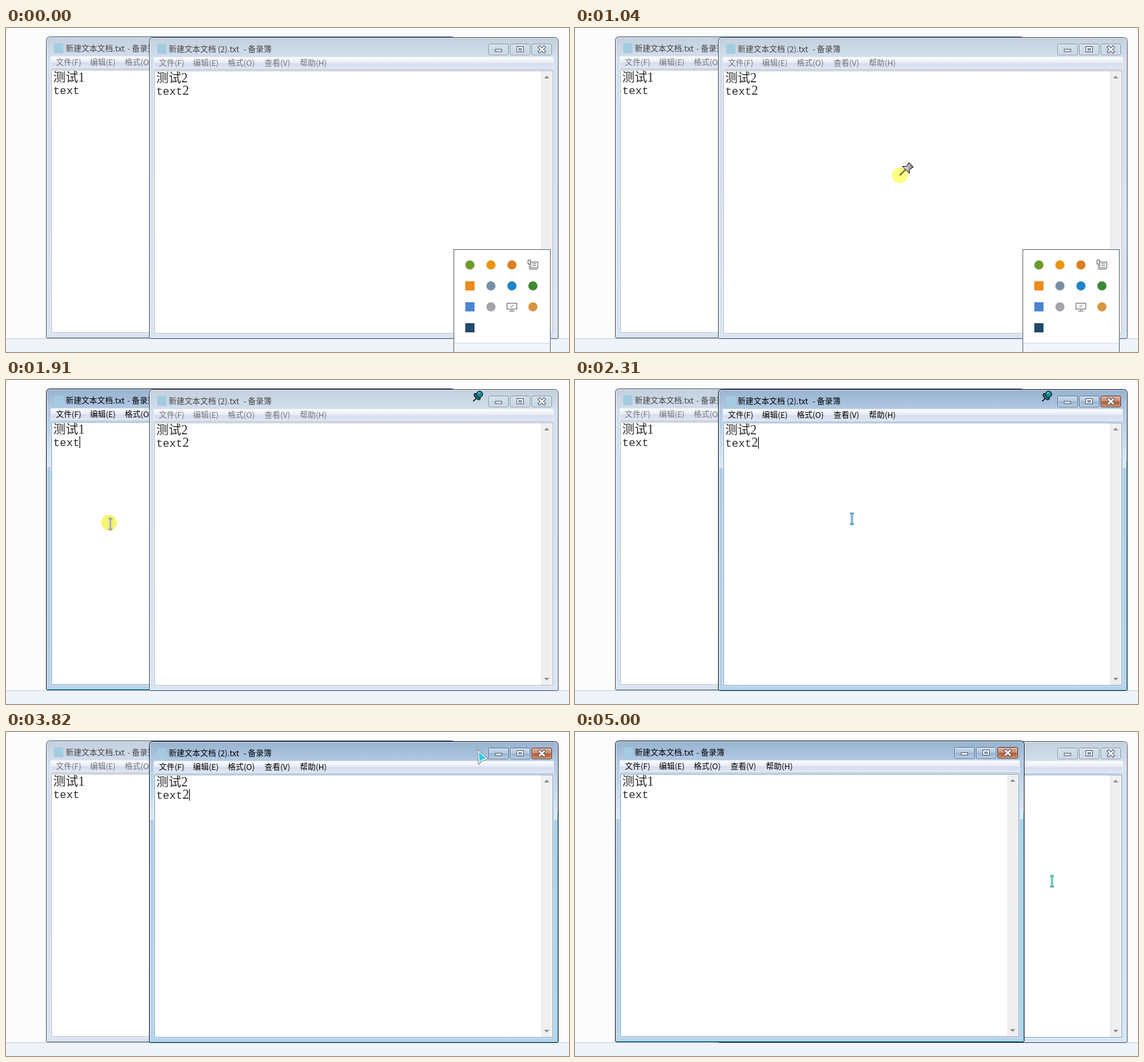
An HTML page for the animation above (5160 ms loop, 858 px wide and 495 px high).

```html
<!DOCTYPE html>
<html lang="zh">
<head>
<meta charset="utf-8">
<style>
html, body { margin: 0; width: 100%; height: 100%; overflow: hidden; background: #fcfcfc; }
svg { display: block; width: 858px; height: 495px; }
text { white-space: pre; font-family: "Noto Sans CJK SC", "Noto Sans CJK", sans-serif; font-size: 12px; }
.cjk { font-size: 19px; font-weight: 300; fill: #2c2c2c; }
.mono { font-family: "Liberation Mono", monospace; font-size: 16.67px; fill: #2c2c2c; }
.digit { font-family: "Liberation Serif", serif; font-size: 20px; fill: #2c2c2c; }
.frame { fill: url(#dim); stroke: #4a5662; }
.title { fill: #444; }
.menu { fill: #757575; }
.btn { fill: url(#btnDim); stroke: #8a99aa; }
.edit { fill: #fff; stroke: #b4bac2; }
.glow { visibility: hidden; }
.hot .edit { stroke: #6fa5ca; }
.on .frame { fill: url(#lit); stroke: #131c25; }
.on .title, .on .menu { fill: #000; }
.on .btn { fill: url(#btnLit); stroke: #5d7691; }
.on .close { fill: url(#closeLit); stroke: #5a2a20; }
.on .glow { visibility: visible; }
</style>
</head>
<body>
<svg id="stage" viewBox="0 0 858 495" xmlns="http://www.w3.org/2000/svg">
  <defs>
    <linearGradient id="dim" x2="0" y2="1">
      <stop offset="0" stop-color="#c2cfdd"/><stop offset=".07" stop-color="#d3dfec"/><stop offset="1" stop-color="#d7e4f2"/>
    </linearGradient>
    <linearGradient id="lit" x2="0" y2="1">
      <stop offset="0" stop-color="#97b2cf"/><stop offset=".07" stop-color="#b3cbe5"/><stop offset="1" stop-color="#b9d1ea"/>
    </linearGradient>
    <linearGradient id="btnDim" x2="0" y2="1">
      <stop offset="0" stop-color="#d2deea"/><stop offset="1" stop-color="#c9d7e5"/>
    </linearGradient>
    <linearGradient id="btnLit" x2="0" y2="1">
      <stop offset="0" stop-color="#c8d9ec"/><stop offset=".48" stop-color="#b2c8e0"/>
      <stop offset=".5" stop-color="#96b1d0"/><stop offset="1" stop-color="#b4cce6"/>
    </linearGradient>
    <linearGradient id="closeLit" x2="0" y2="1">
      <stop offset="0" stop-color="#dfb09b"/><stop offset=".48" stop-color="#cc8a6c"/>
      <stop offset=".5" stop-color="#ad552f"/><stop offset="1" stop-color="#d28c5e"/>
    </linearGradient>
    <linearGradient id="menuBar" x2="0" y2="1">
      <stop offset="0" stop-color="#fbfcff"/><stop offset=".45" stop-color="#e6ebf5"/>
      <stop offset=".5" stop-color="#d5dced"/><stop offset="1" stop-color="#e1e7f5"/>
    </linearGradient>
    <linearGradient id="sheen" x2="0" y2="1">
      <stop offset="0" stop-color="#fff" stop-opacity="0"/><stop offset="1" stop-color="#fff" stop-opacity=".6"/>
    </linearGradient>
    <linearGradient id="steel">
      <stop offset="0" stop-color="#fff"/><stop offset="1" stop-color="#777"/>
    </linearGradient>
  </defs>
  <path d="M0 475H858V495H0z" fill="#eff3fa"/>
  <path d="M0 474.5H858" stroke="#c3d2e3"/>
  <g id="wins"></g>
  <g id="pin" stroke="#000">
    <path d="M712 32.500L718 27" stroke-width="1.6"/>
    <ellipse cx="718" cy="25.500" rx="6" ry="2.800" transform="rotate(45 718 25.500)" fill="#147886"/>
    <circle cx="721.700" cy="21.800" r="4.800" fill="#1b8796"/>
    <path d="M719.500 21L722 19" stroke="#8fdbe2" stroke-width="1.5"/>
  </g>
  <g id="tray"></g>
  <g id="cursor">
    <circle id="click" r="12"/>
    <g id="arrow" stroke-linejoin="round">
      <path d="M.5 .5L2 23.500L7.500 18.500L17 15z" fill="#fff" stroke="#8b979d" stroke-width="1.2"/>
      <path d="M2.500 4.500L3.700 19.500L7.300 16.200L13.500 14.200z" fill="#31cbe4"/>
    </g>
    <g id="beam" fill="none"></g>
    <g id="tack" stroke="#000">
      <path d="M0 0L9 -9" stroke="#4a4a2c" stroke-width="2"/>
      <path d="M1.500 -1.500L9 -9" stroke="#b5b592" stroke-width=".7"/>
      <path d="M4 -13.500H10L14 -19.500L20.500 -12.500L15 -9L14.500 -3z" fill="url(#steel)" stroke-linejoin="round"/>
    </g>
  </g>
</svg>
<script>
const $ = id => document.getElementById(id);
const show = (el, on) => el.setAttribute('visibility', on ? 'inherit' : 'hidden');
const at = (x, y) => `translate(${x} ${y})`;
const rect = (x, y, w, h, more) => `<rect x="${x}" y="${y}" width="${w}" height="${h}" ${more}/>`;
const label = (x, y, cls, s) => `<text x="${x}" y="${y}" class="${cls}">${s}</text>`;

function button(x, glyph, cls = '') {
  return `<g transform="${at(x, 10)}">` + rect(.5, .5, 30, 16.5, `rx="2" class="btn ${cls}"`) +
    rect(1.5, 1.5, 28, 14.5, 'rx="1" fill="none" stroke="#fff" opacity=".4"') + glyph + '</g>';
}

function makeWin(x, y, name, nameW, digit, tail = '') {
  const g = document.createElementNS('http://www.w3.org/2000/svg', 'g');
  const menus = [[15, '文件(F)'], [67, '编辑(E)'], [120, '格式(O)'], [176, '查看(V)'], [230, '帮助(H)']];
  const ink = 'fill="#fff" stroke="#535d6a"';
  const cross = 'M12 5.500L19 12M19 5.500L12 12';
  const caretX = 51.5 + tail.length * 10;
  g.setAttribute('transform', at(x, y));
  g.innerHTML =
    '<path class="frame" d="M.5 459.500V6.500Q.5 .5 6.500 .5H617.500Q623.500 .5 623.500 6.500V459.500L622.500 460.500H1.500z"/>' +
    '<path d="M1.500 459V7Q1.500 1.500 7 1.500H617Q622.500 1.500 622.500 7V459" fill="none" stroke="#fff" opacity=".55"/>' +
    '<g class="glow">' + rect(2, 40, 5, 80, 'fill="url(#sheen)"') + rect(617, 40, 5, 80, 'fill="url(#sheen)"') +
    '<path d="M1 459.500H622.500V110" fill="none" stroke="#45cfea" opacity=".7"/></g>' +
    rect(7.5, 30.5, 609, 423, 'fill="#f0f2f6" stroke="#fff" stroke-opacity=".45"') +
    rect(12.5, 10.5, 14, 15, 'rx="1" fill="#a3cbe0"') +
    label(30, 23, 'title', name) + label(30 + nameW, 23, 'title', '- 备录簿') +
    button(517, rect(10.5, 8.5, 10, 3.5, ink)) +
    button(550, rect(10.5, 4.5, 10, 8, ink) + rect(13.5, 7.5, 4, 2.5, 'fill="#bccde0" stroke="#535d6a"')) +
    button(583, `<path d="${cross}" stroke="#535d6a" stroke-width="4.500" stroke-linecap="square"/>` +
      `<path d="${cross}" stroke="#fff" stroke-width="2.400" stroke-linecap="square"/>`, 'close') +
    rect(8, 31, 608, 18, 'fill="url(#menuBar)"') + rect(8, 49, 608, 1, 'fill="#b3bac8"') +
    menus.map(([mx, s]) => label(mx, 44, 'menu', s)).join('') +
    rect(8.5, 51.5, 607, 401, 'class="edit"') +
    rect(598, 52, 17, 400, 'fill="#efefef"') + rect(598, 52, 1, 400, 'fill="#e3e3e3"') +
    '<path d="M602 63L606 59L610 63zM602 441L606 445L610 441z" fill="#8a8a8a"/>' +
    label(11, 69, 'cjk', '测试') + label(49, 69, 'digit', digit) +
    label(11, 88, 'mono', 'text') + label(51, 88, 'digit', tail) +
    `<path class="caret" d="M${caretX} 73V91" stroke="#000"/>`;
  $('wins').append(g);
  return { g, caret: g.querySelector('.caret') };
}

const first = makeWin(61, 13, '新建文本文档.txt', 94, '1');
const second = makeWin(218, 14, '新建文本文档 (2).txt', 114, '2', '2');

function makeTray() {
  const dots = ['#6f9a2c', '#e8960f', '#d97f22', '', '#ee8a1c', '#7790a6', '#2084c8', '#3d8a34', '#4a86d0', '#a3a3a8', '', '#d8953f', '#23496b'];
  const squares = [4, 8, 12];
  const line = 'fill="#f4f4f4" stroke="#6b6b6b"';
  const device = rect(-3.5, -4.5, 11, 9, line) + rect(-7.5, -7.5, 4, 6, line) +
    '<path d="M-5.500 -1V6.500H7M-1 -2H5M-1 1H5" fill="none" stroke="#777"/>';
  const monitor = rect(-7.5, -5.5, 15, 9, line) + '<path d="M0 4V6.500M-4 6.500H4M-2 1L2 -3" stroke="#6b6b6b"/>';
  let s = rect(682.5, 338.5, 147, 160, 'fill="#fff" stroke="#5e6b78"') +
    rect(683, 482, 146, 13, 'fill="#f1f5fb"') + rect(683, 481, 146, 1, 'fill="#ccd9ea"');
  dots.forEach((c, i) => {
    const shape = i === 3 ? device : i === 10 ? monitor :
      squares.includes(i) ? rect(-7, -7, 14, 14, `fill="${c}"`) : `<circle r="7" fill="${c}"/>`;
    s += `<g transform="${at(707 + i % 4 * 32, 362 + (i >> 2) * 32)}">${shape}</g>`;
  });
  $('tray').innerHTML = s;
}
makeTray();

const ibeam = 'M-3 -8H-1L0 -7L1 -8H3M0 -7V7M-3 8H-1L0 7L1 8H3';
$('beam').innerHTML = [['#9fa9a9', 4.4], ['#fff', 3.2], ['#4a9fcb', 1.8]]
  .map(([c, w]) => `<path d="${ibeam}" stroke="${c}" stroke-width="${w}"/>`).join('');
const beamCore = $('beam').lastChild;

// The picture refreshes every 80 ms inside these spans and rests between them.
const LOOP = 5160, STEP = 80;
const spans = [[160, 1200], [1510, 3350], [3500, 3820], [3970, 4450], [4600, 5000]];
const path = [
  [160, 720, 432], [480, 704, 461], [720, 704, 455], [880, 655, 365], [1040, 495, 225],
  [1200, 494, 224], [1510, 470, 222], [1750, 250, 219], [1910, 159, 220], [2070, 162, 219],
  [2230, 370, 214], [2310, 422, 212], [2550, 485, 225], [2710, 572, 325], [2790, 645, 350],
  [2870, 682, 338], [2950, 735, 228], [3030, 742, 172], [3110, 733, 96], [3190, 725, 55],
  [3350, 718, 24], [3740, 718, 26], [3820, 718, 26], [3970, 640, 70], [4130, 365, 165],
  [4290, 190, 210], [4450, 188, 211], [4600, 215, 212], [4840, 600, 226], [5000, 727, 228]
];
// start time, active window
const focus = [[0, 0], [1120, 2], [1910, 1], [2230, 2], [3580, 0], [3740, 2], [4290, 1]];
const clicks = [[480, 640], [1040, 1120], [1910, 2070], [2230, 2310], [3500, 3660], [4290, 4450]];

const within = (t, a, b) => t >= a && t < b;

function held(t) {
  let h = 0;
  for (const [a, b] of spans) if (t >= a) h = Math.min(b, a + Math.floor((t - a) / STEP) * STEP);
  return h;
}

function pointer(t) {
  const i = path.findIndex(p => p[0] > t);
  if (i < 0) return path[path.length - 1].slice(1);
  if (i === 0) return path[0].slice(1);
  const [a, ax, ay] = path[i - 1], [b, bx, by] = path[i], k = (t - a) / (b - a);
  return [ax + (bx - ax) * k, ay + (by - ay) * k];
}

let front = second;
function render(time) {
  const t = held(time);
  const [x, y] = pointer(t);
  const [since, active] = focus.filter(f => f[0] <= t).pop();
  const top = t >= 4290 ? first : second;
  if (top !== front) $('wins').append((front = top).g);

  const blink = Math.floor((t - since) / 530) % 2 === 0;
  [first, second].forEach((w, i) => {
    const on = active === i + 1;
    w.g.classList.toggle('on', on);
    w.g.classList.toggle('hot', on || (i === 1 && t >= 4600 && x > 685));
    show(w.caret, on && blink);
  });
  show($('tray'), t < 1120);
  show($('pin'), within(t, 1120, 3660));

  const tack = within(t, 720, 1120) || within(t, 3270, 3740);
  const arrow = !tack && (y < 65 || y > 430);
  const beam = !tack && !arrow;
  const click = clicks.some(([a, b]) => within(t, a, b));
  show($('cursor'), t >= 160);
  show($('tack'), tack);
  show($('arrow'), arrow);
  show($('beam'), beam);
  show($('click'), click);
  $('cursor').setAttribute('transform', at(Math.round(x), Math.round(y)));
  $('click').setAttribute('transform', beam ? at(-2, -2) : at(0, 0));
  $('click').setAttribute('fill', beam ? '#f6f66e' : '#ffff80');
  beamCore.setAttribute('stroke', click ? '#a3a078' : t < 2800 ? '#4a9fcb' : '#3cbf9f');
}

const begin = performance.now();
function tick() {
  render((performance.now() - begin) % LOOP);
  requestAnimationFrame(tick);
}
tick();
</script>
</body>
</html>
```
